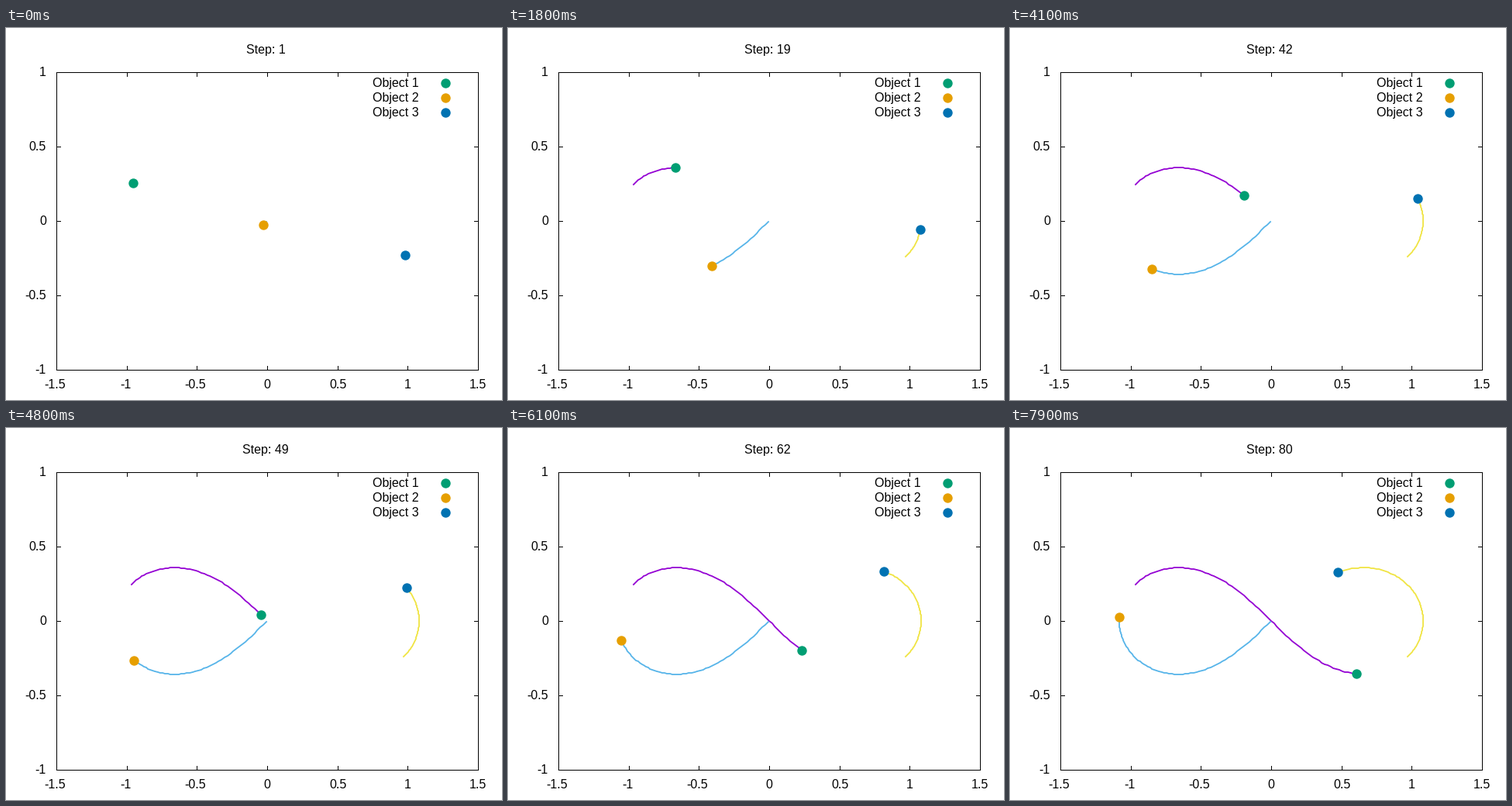
A matplotlib script that plays this animation: 640x480 px, repeating every 8000 ms.

```python
import numpy as np
import matplotlib.pyplot as plt
from matplotlib.animation import FuncAnimation
from matplotlib.patches import Circle

W, H, DPI = 640, 480, 80
PT = 72 / DPI  # points per pixel
STEPS = 80
LEFT, RIGHT, TOP, BOTTOM = 65, 609, 57, 441
PERIOD = 6.32591398

plt.rcParams["font.family"] = "Liberation Sans"
plt.rcParams["text.hinting"] = "default"


def px(x):
    return np.floor(LEFT + (x + 1.5) / 3 * (RIGHT - LEFT) + 0.5)


def py(y):
    return np.floor(TOP + (1 - y) / 2 * (BOTTOM - TOP) + 0.5)


# Figure-eight three-body orbit, positions as complex numbers
def accel(z):
    d = z[None, :] - z[:, None]
    r = np.abs(d) + np.eye(3)
    return (d / r**3).sum(axis=1)


def deriv(s):
    return np.array([s[1], accel(s[0])])


def integrate(t_end, dt=0.001):
    z = 0.97000436 - 0.24308753j
    v = -0.93240737 - 0.86473146j
    s = np.array([[-z, 0, z], [-v / 2, v, -v / 2]])
    out = [s[0]]
    for _ in range(int(t_end / dt)):
        k1 = deriv(s)
        k2 = deriv(s + dt / 2 * k1)
        k3 = deriv(s + dt / 2 * k2)
        k4 = deriv(s + dt * k3)
        s = s + dt / 6 * (k1 + 2 * k2 + 2 * k3 + k4)
        out.append(s[0])
    return np.arange(len(out)) * dt, np.array(out)


# Adaptive stepping: shorter time steps while two bodies are close
times, orbit = integrate(1.8)
tau = times / (PERIOD / 6)
step_at = 51.3 * (tau - 0.115 / (2 * np.pi) * np.sin(2 * np.pi * tau)) - 0.2
steps = np.arange(STEPS + 1)
track = [(px(np.interp(steps, step_at, orbit[:, i].real)),
          py(np.interp(steps, step_at, orbit[:, i].imag))) for i in range(3)]

fig = plt.figure(figsize=(W / DPI, H / DPI), dpi=DPI, facecolor="white")
ax = fig.add_axes([0, 0, 1, 1])
ax.set_xlim(0, W)
ax.set_ylim(H, 0)
ax.axis("off")


def line(xs, ys, z=1):
    """One-pixel black line through pixel centres."""
    ax.plot(np.add(xs, 0.5), np.add(ys, 0.5), color="black", lw=PT, zorder=z,
            snap=False, solid_capstyle="projecting", solid_joinstyle="miter")


def label(x, y, s, ha="center"):
    return ax.text(x, y, s, fontsize=16 * PT, ha=ha, va="baseline", zorder=20)


def dot(x, y, color, z):
    return ax.add_patch(Circle((x + 0.5, y + 0.5), 6.2, fc=color, ec="none",
                               snap=False, zorder=z))


line([LEFT, RIGHT, RIGHT, LEFT, LEFT], [TOP, TOP, BOTTOM, BOTTOM, TOP], z=15)
for v in np.arange(-1.5, 1.6, 0.5):
    x = px(v)
    line([x, x], [TOP, TOP + 5])
    line([x, x], [BOTTOM - 5, BOTTOM])
    label(x - 2 * (v < 0), 465, f"{v:g}")
for v in np.arange(-1, 1.1, 0.5):
    y = py(v)
    line([LEFT, LEFT + 5], [y, y])
    line([RIGHT - 5, RIGHT], [y, y])
    label(52, y + 5, f"{v:g}", ha="right")

title = label(335, 33, "")
trail_colors = ["#9400d3", "#56b4e9", "#f0e442"]
dot_colors = ["#009e73", "#e69f00", "#0072b2"]
trails, dots = [], []
for i in range(3):
    y = 71 + 19 * i
    label(473, y + 5, f"Object {i + 1}", ha="left")
    dot(567, y, dot_colors[i], 10)
    trails += ax.plot([], [], color=trail_colors[i], lw=1.8 * PT, snap=False,
                      zorder=2 + 2 * i)
    dots.append(dot(0, 0, dot_colors[i], 3 + 2 * i))


def draw(frame):
    n = frame + 1
    title.set_text(f"Step: {n}")
    for (xs, ys), trail, body in zip(track, trails, dots):
        trail.set_data(xs[:n + 1], ys[:n + 1])
        body.center = (xs[n] + 0.5, ys[n] + 0.5)
    return [title, *trails, *dots]


anim = FuncAnimation(fig, draw, frames=STEPS, interval=100, repeat=True,
                     repeat_delay=0, blit=False)
plt.show()
```
